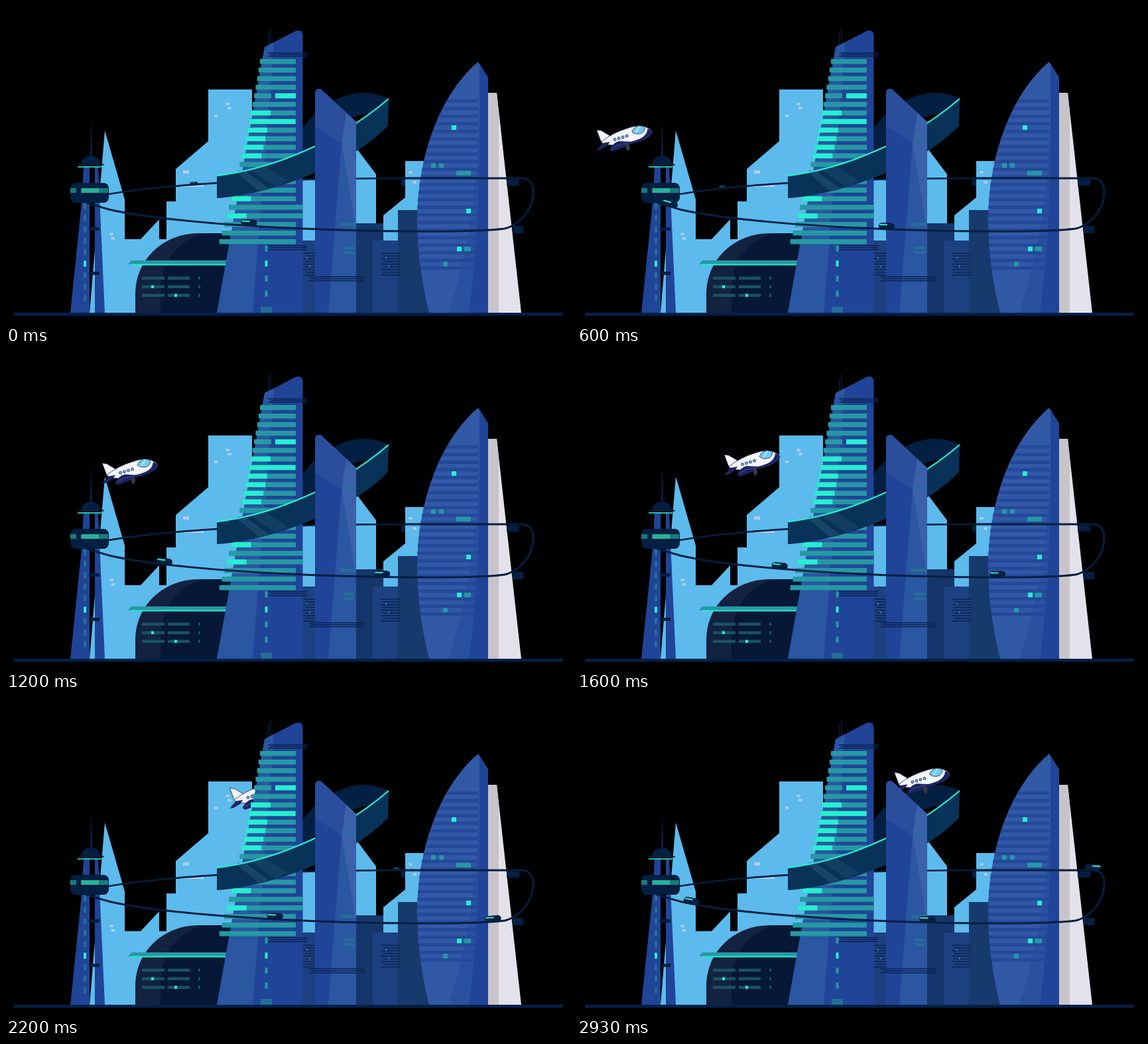
Recreate the animation shown at these times as an HTML page. Size 852 by 480 pixels, loop 2990 ms.

```html
<!DOCTYPE html>
<html lang="en">
<head>
<meta charset="utf-8">
<title>Night city</title>
<style>
html, body { margin: 0; width: 100%; height: 100%; overflow: hidden; background: #000; }
svg { display: block; width: 100vw; height: 100vh; }
</style>
</head>
<body>
<svg id="stage" viewBox="0 0 852 480"></svg>
<script>
const LOOP = 2990, STEP = LOOP / 45;
const SKY = '#5cbaec', PALE = '#b4cdf0', BLUE = '#204497', MID = '#2a56a2', LIGHT = '#3159a6';
const NAVY = '#031f42', DARK = '#14366a', TEAL = '#2599a4', DIM = '#236f95', GLOW = '#25f0d0', INK = '#1b2460';

const stage = document.getElementById('stage');
const rect = (x, y, w, h, fill, extra = '') =>
  `<rect x="${x}" y="${y}" width="${w}" height="${h}" fill="${fill}" ${extra}/>`;
const path = (d, fill, extra = '') => `<path d="${d}" fill="${fill}" ${extra}/>`;
const line = (d, color, width, extra = '') =>
  path(d, 'none', `stroke="${color}" stroke-width="${width}" ${extra}`);
const group = (content, extra) => `<g ${extra}>${content}</g>`;
const repeat = (n, draw) => Array.from({ length: n }, (_, i) => draw(i)).join('');
const bars = (n, x, y, w, gap) => repeat(n, i => rect(x + i % 2 * 3, y + gap * i, w - i % 2 * 3, 1.5, '#0a2452'));

let seed = 5;
const random = () => (seed = seed * 16807 % 2147483647) / 2147483647;
const paleWindows = (n, x, y, w, h) =>
  repeat(n, () => rect(x + random() * w, y + random() * h, 5.5, 3.5, PALE));

function backdrop() {
  return path('M149 188L179 292V352H203L231 322V352H242V295H256V246L305 204V126H371V463H126Z', SKY) +
    path('M446 262H528V214L558 254V356H446Z', SKY) +
    path('M602 234H640V356H569V316L602 289Z', SKY) +
    paleWindows(3, 314, 143, 26, 32) + paleWindows(2, 153, 333, 14, 24) + paleWindows(2, 606, 243, 8, 36) +
    rect(267, 248, 9, 5, PALE) + rect(268, 270, 30, 3, PALE);
}

function whiteTower() {
  return path('M727 131H740L777 463H727Z', '#e3e2ea') + path('M727 131H740L743 160V463H727Z', '#c9c4ca') +
    rect(596, 262, 6, 9, NAVY) + rect(755, 262, 19, 9, NAVY) + rect(764, 332, 16, 11, NAVY);
}

function sail() {
  const shape = 'M712 84L727 108V463H638C628 425 620 375 620 320C620 240 648 138 712 84Z';
  const shade = (top, foot) => `M714 84V${top}Q716 ${top + 195} ${foot} 463H727V84Z`;
  const row = 11.45;
  const lamp = (x, k) => rect(x, 180 + row * k, 7, 7, GLOW);
  const glass = (x, k, w) => rect(x, 180 + row * k, w, 7, TEAL);
  return `<clipPath id="sailClip"><path d="${shape}"/></clipPath>` +
    group(path(shape, LIGHT) + path(shade(120, 667), '#2a51a0') + path(shade(135, 698), BLUE) +
      repeat(23, k => rect(620, 141 + row * k, 92 - Math.max(0, k - 17) * 1.5, 5, '#24489a')) +
      lamp(672, 0) + lamp(694, 11) + lamp(680, 16) +
      glass(641, 5, 7) + glass(653, 5, 7) + glass(679, 6, 22) + glass(691, 16, 10) + glass(659, 18, 7),
      'clip-path="url(#sailClip)"');
}

function dome() {
  return path('M195 463V435C195 380 240 343 290 343H340V463Z', '#13223f') +
    path('M233 463V432C233 380 265 350 300 343H340V463Z', '#061835') +
    path('M184 390L189 384H332V390Z', TEAL) + rect(188, 389.5, 144, 2, GLOW) +
    repeat(3, i => {
      const y = 408.5 + 13 * i;
      return rect(205, y, 34, 4.5, '#175365') + rect(244, y, 33, 4.5, '#175365') +
        rect(290, y, 3, 4.5, '#175365') + (i ? rect(184 + 35 * i, y, 4, 4.5, GLOW) : '');
    });
}

function lowBlocks() {
  return rect(528, 328, 41, 135, DARK) + rect(553, 354, 42, 109, '#1d4180') +
    rect(591, 308, 49, 155, '#173a6c') + rect(446, 354, 21, 109, '#1d4180') +
    bars(9, 448, 372.5, 18, 4.1) + bars(9, 565, 372.5, 29, 4.1) +
    repeat(2, i => rect(453 + 4 * i, 379 + 13 * i, 2, 2, TEAL) + rect(572 + 4 * i, 379 + 13 * i, 2, 2, TEAL));
}

// Window bands follow the flaring wall; the middle storeys are lit from the left.
function towerWindows() {
  return repeat(22, i => {
    const drop = 12.95 * i, y = 80 + drop, left = 383 - 0.16 * drop - 0.00024 * drop * drop;
    const lit = i > 5 && i < 12 || i === 16 || i === 18;
    const bright = 30 + 40 * Math.max(0, 1 - Math.abs(i - 7));
    return rect(left, y, 437 - left, 7.5, TEAL) + (lit ? rect(left, y, bright, 7.5, GLOW) : '');
  }) + rect(400, 131.5, 6, 8, BLUE) + rect(406, 131.8, 31, 7.5, GLOW) +
    rect(437, 300, 11, 7.5, TEAL) + rect(437, 313, 11, 7.5, TEAL);
}

function mainTower() {
  return line('M395.5 40V60M398.5 34V58', '#0b2350', 1) +
    path('M390 62L437 37.5Q447 35 447.5 44V463H318Z', BLUE) +
    path('M390 62L404 54.5L372 463H318Z', MID) + towerWindows() +
    repeat(4, i => rect(390.5, 361.5 + 22.7 * i, 4, 9, i === 1 ? GLOW : TEAL)) +
    rect(384, 454, 17, 9, DIM) + bars(3, 395, 70, 59, 2.5) + bars(3, 395, 361, 59, 3);
}

function ring() {
  const top = 'M318 256C405 246 505 202 577 140';
  return path(top + 'L576 181C520 240 400 285 318 290Z', '#083258') +
    path('M349 252L362 250L398 276L382 280Z', '#174467') + path('M370 248L393 243L425 264L406 273Z', '#123e63') +
    line(top, GLOW, 2.3);
}

function slimTower() {
  return path('M466 131Q467 123 475 125.5L528 175V463H466Z', BLUE) +
    path('M466 131Q467 123 475 125.5L513 161L506 207L466 182Z', '#2b4e9c') +
    path('M513 161L528 175V463H486L506 207Z', MID) + path('M513 161L528 175V340L506 207Z', '#3a61aa') +
    rect(511, 204, 15, 3, DIM) + rect(504, 327, 22, 5, DIM) +
    rect(509, 363, 16, 4.5, DIM) + rect(509, 370, 16, 4.5, DIM) + bars(3, 457, 408, 84, 3);
}

function spireTower() {
  return path('M128.5 172L130 228H127Z', '#0b2350') +
    path('M113 240Q115 226 128 226Q141 226 143 240Z', NAVY) +
    path('M117 243H126V463H97L114 297Z', BLUE) + path('M134 243H139L149 463H134Z', BLUE) +
    rect(108, 238.5, 40, 1.8, NAVY) + rect(108, 242, 36, 1.6, GLOW) +
    rect(125, 334, 16, 5, NAVY) + rect(125, 401, 16, 5, NAVY) +
    repeat(9, i => rect(117, 298 + 17.3 * i, 4, 9, i === 5 ? GLOW : DIM)) +
    rect(97, 267, 58, 30, NAVY, 'rx="8"') + rect(97, 275, 57, 7, '#177d7c') +
    rect(106, 275, 7, 7, NAVY) + rect(114, 275, 26, 7, '#28b09a');
}

function plane() {
  const edge = `stroke="${INK}" stroke-width=".8"`;
  return path('M30 187L37 188L52 197L40 208L36 203Z', '#f4f4fc', edge) +
    path('M37 205Q54 191 78 184Q96 178 105 183Q114 187 114 191Q110 198 98 203Q80 210 55 210Q40 210 37 205Z', '#f4f4fc', edge) +
    path('M107 185Q114 188 114 191Q110 198 98 203Q80 210 55 210Q82 206 96 200Q106 195 107 185Z', INK) +
    path('M83 190Q86 183 92 181Q100 180 103 184Q102 190 98 192Q90 195 83 190Z', '#6fcbed', edge) +
    line('M89 191L95 182', '#b5e8f8', 2) +
    path('M30 218L39 207L50 205L46 211L36 217Z', INK) +
    path('M49 217Q55 206 64 204L83 205Q78 211 70 214L53 220Z', INK) +
    line('M53 216Q61 208 78 207', '#43509a', 1) +
    `<ellipse cx="77" cy="213" rx="3" ry="5.5" fill="#343747"/>` +
    repeat(4, i => `<circle cx="${57.5 + 6 * i}" cy="${201.5 - 1.8 * i}" r="1.9" fill="#7fcdf0" stroke="${INK}"/>`);
}

const FRONT = 'M104 290C118 297 135 301 155 307C215 321 330 331 448 336C530 339.5 620 340.5 680 340C715 339 740 338 752 336C772 331 795 310 795 280C795 266 788 260 776 260H596';
const BACK = 'M720 260H600C540 260 500 260.5 448 262C390 263 250 268 155 284';
const frontCar = path('M-12 -2Q-11 -5 -5 -5H7Q12 -4 12 0Q12 4 7 5H-7L-12 2Z', NAVY) + line('M-11 -2H1', GLOW, 2);
const backCar = path('M-7 1L-4 -2H5L7 2H-7Z', NAVY) + line('M-3 -1H4', '#19756f', 1.2);

// Each train starts at a distance along its track; negative ones have yet to appear.
const lines = [
  { id: 'front', d: FRONT, width: 3, car: frontCar, speed: 0.168, lift: 4.5, starts: [267, -62, -419] },
  { id: 'back', d: BACK, width: 2.6, car: backCar, speed: 0.108, lift: 2.2, starts: [437, -106] }
];
const railway = ({ id, d, width, car, starts }) =>
  line(d, NAVY, width, `id="${id}"`) + starts.map((_, i) => group(car, `id="${id}${i}"`)).join('');

stage.innerHTML =
  '<clipPath id="art"><rect x="12" width="828" height="480"/></clipPath>' +
  rect(0, 0, 852, 480, '#000') + backdrop() + railway(lines[1]) +
  path('M446 186C480 138 535 118 577 140V149L562 164C540 158 500 170 446 226Z', NAVY) +
  group(group(plane(), 'id="plane"'), 'clip-path="url(#art)"') +
  lowBlocks() + whiteTower() + sail() + dome() + mainTower() + ring() + slimTower() + spireTower() +
  rect(12, 463, 828, 4.5, '#02214a') + railway(lines[0]);

const find = id => document.getElementById(id);

function placeTrain(node, track, distance, lift) {
  const shown = distance > 0 && distance < track.getTotalLength();
  node.setAttribute('visibility', shown ? 'visible' : 'hidden');
  if (!shown) return;
  const [rear, p, fore] = [-1, 0, 1].map(step => track.getPointAtLength(distance + step));
  const angle = Math.atan2(fore.y - rear.y, fore.x - rear.x) * 180 / Math.PI;
  const flip = Math.abs(angle) > 120 ? -1 : 1;
  node.setAttribute('transform', `translate(${p.x} ${p.y - lift}) rotate(${angle}) scale(1 ${flip})`);
}

function draw(time) {
  const travel = (time - 600) * 0.193;
  find('plane').setAttribute('transform', `translate(${travel} ${-travel / 6})`);
  for (const { id, speed, lift, starts } of lines)
    starts.forEach((start, i) => placeTrain(find(id + i), find(id), start + speed * time, lift));
}

const began = performance.now();
function tick() {
  const time = (performance.now() - began) % LOOP;
  draw(Math.floor(time / STEP) * STEP);
  requestAnimationFrame(tick);
}
tick();
</script>
</body>
</html>
```
